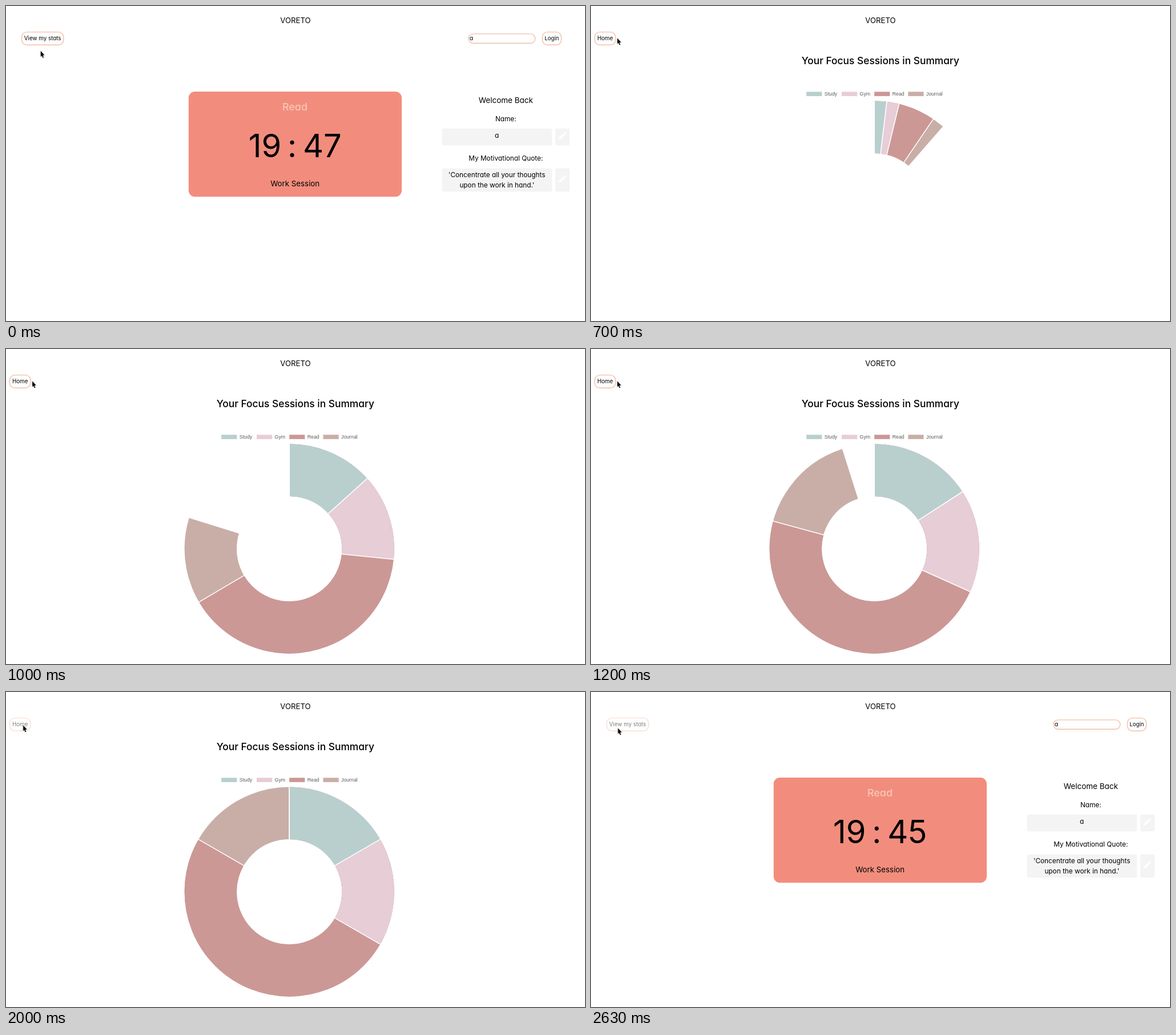
An HTML page that plays this animation: 1014 px wide and 552 px high, repeating every 2.77 s.

```html
<!DOCTYPE html>
<html lang="en">
<head>
<meta charset="utf-8">
<title>Focus timer</title>
<style>
@property --u { syntax: "<number>"; inherits: true; initial-value: 1; }

html, body { margin: 0; width: 100%; height: 100%; overflow: hidden; background: #fff; }
svg { display: block; width: 100%; height: 100%; }
text {
  font-family: Inter, "Open Sans", sans-serif;
  font-feature-settings: "cv11", "calt" 0;
  font-optical-sizing: none;
  text-anchor: middle;
}

.home, .stats, .cursor, .ring, .btn, .early, .late { animation: 2770ms step-end infinite; }
.home { animation-name: home; }
.stats { animation-name: stats; }
.early { animation-name: early; }
.late { animation-name: late; }
.cursor { animation-name: move; }
.view { animation-name: view; }
.back { animation-name: back; }

.outline { fill: #fff; stroke: #f2bfab; stroke-width: 1.4; }
.btn text { font-size: 9.8px; }
.field { fill: #f4f4f4; }
.time { font-size: 56px; word-spacing: -5px; }
.label { font-size: 11.8px; }
.quote { font-size: 11.8px; }
.legend text { font: 8.75px "Liberation Sans", Arial, sans-serif; fill: #5c5c5c; text-anchor: start; }

/* Quartic ease-out, sampled ten times a second */
.ring { animation-name: sweep; }
.ring * { --p: calc(1 - var(--u) * var(--u) * var(--u) * var(--u)); }
.ring circle {
  fill: none;
  stroke-width: 91.4;
  stroke-dasharray: calc(var(--p) * var(--k) * 1px) 400px;
  transform: rotate(-90deg);
}
.ring line {
  stroke: #fff;
  stroke-width: 1.6;
  transform: rotate(calc(var(--p) * var(--k) * 1deg));
}

@keyframes home { 0% { opacity: 1 } 25.27% { opacity: 0 } 86.64%, 100% { opacity: 1 } }
@keyframes stats { 0% { opacity: 0 } 25.27% { opacity: 1 } 86.64%, 100% { opacity: 0 } }
@keyframes early { 0% { opacity: 1 } 50%, 100% { opacity: 0 } }
@keyframes late { 0% { opacity: 0 } 50%, 100% { opacity: 1 } }
@keyframes view { 0% { opacity: 1 } 7.22%, 100% { opacity: .5 } }
@keyframes back { 0% { opacity: 1 } 64.98%, 100% { opacity: .5 } }
@keyframes sweep {
  0% { --u: .9702 }
  25.27% { --u: .9702; animation-timing-function: steps(10) }
  61.37%, 100% { --u: -.0298 }
}
@keyframes move {
  0% { transform: translate(61px, 79.5px) }
  3.61% { transform: translate(56px, 70px) }
  7.22% { transform: translate(49px, 61px) }
  10.83% { transform: translate(46.3px, 57px) }
  61.37% { transform: translate(44px, 57.5px) }
  64.98% { transform: translate(37px, 58.5px) }
  68.59% { transform: translate(32px, 59px) }
  72.2% { transform: translate(30.3px, 59px) }
  90.25% { transform: translate(38px, 61.5px) }
  94.94%, 100% { transform: translate(47.5px, 64px) }
}
</style>
</head>
<body>
<svg viewBox="0 0 1014 552">
  <defs>
    <g id="pencil" fill="#fff">
      <path d="M-6 6V3.3L1.5-4.2 4.2-1.5-3.3 6ZM2.4-5.1 3.9-6.5Q4.4-6.9 4.9-6.5L6.5-4.9Q6.9-4.4 6.5-3.9L5.1-2.4Z"/>
    </g>
  </defs>

  <text x="507" y="29.7" font-size="13.2">VORETO</text>

  <g class="home">
    <g class="btn view">
      <rect class="outline" x="27.5" y="45.6" width="73.3" height="22.7" rx="9"/>
      <text x="64.2" y="60">View my stats</text>
    </g>
    <rect class="outline" x="810" y="48.9" width="116.8" height="16.3" rx="8.1"/>
    <text x="815" y="60.3" font-size="10.5">a</text>
    <rect class="outline" x="939.3" y="45.6" width="33.2" height="22.7" rx="9"/>
    <text x="955.9" y="60" font-size="9.6">Login</text>

    <rect x="319.8" y="150" width="373.2" height="184.3" rx="11" fill="#f28d7d"/>
    <text x="506" y="182.7" font-size="17.9" font-weight="500" fill="#fac6b8">Read</text>
    <text class="time early" x="506.3" y="264.6">19 : 47</text>
    <text class="time late" x="506.3" y="264.6">19 : 45</text>
    <text x="506.2" y="315.6" font-size="13.3">Work Session</text>

    <text x="875.3" y="170" font-size="13.5">Welcome Back</text>
    <text class="label" x="875.3" y="201.6">Name:</text>
    <rect class="field" x="763.5" y="214.8" width="192.8" height="29.4" rx="3"/>
    <rect class="field" x="962" y="214.8" width="25.2" height="29.4" rx="3"/>
    <use href="#pencil" x="974.4" y="227.6"/>
    <text class="quote" x="859.5" y="230.6">a</text>
    <text class="label" x="875.3" y="271.2">My Motivational Quote:</text>
    <rect class="field" x="763.5" y="284.6" width="192.8" height="40.6" rx="3"/>
    <rect class="field" x="962" y="284.6" width="25.2" height="40.6" rx="3"/>
    <use href="#pencil" x="974.4" y="303"/>
    <text class="quote" x="859.7" y="300.2">'Concentrate all your thoughts</text>
    <text class="quote" x="859.9" y="318">upon the work in hand.'</text>
  </g>

  <g class="stats">
    <g class="btn back">
      <rect class="outline" x="6.4" y="45.6" width="36.6" height="22.7" rx="9"/>
      <text x="24.7" y="60">Home</text>
    </g>
    <text x="506.8" y="102" font-size="17.35" font-weight="500">Your Focus Sessions in Summary</text>

    <g class="legend">
      <rect x="377.2" y="150.3" width="27.2" height="7.6" fill="#b8cfce"/>
      <text x="408.8" y="157.2">Study</text>
      <rect x="439" y="150.3" width="27.2" height="7.6" fill="#e6cdd6"/>
      <text x="470.6" y="157.2">Gym</text>
      <rect x="496.2" y="150.3" width="27.2" height="7.6" fill="#cb9896"/>
      <text x="527.8" y="157.2">Read</text>
      <rect x="555.4" y="150.3" width="27.2" height="7.6" fill="#c8aea7"/>
      <text x="587" y="157.2">Journal</text>
    </g>

    <!-- Each arc starts at the top and overlaps the longer one below it -->
    <g class="ring" transform="translate(496.2 350.1)">
      <circle r="137.9" pathLength="360" stroke="#c8aea7" style="--k:360"/>
      <circle r="137.9" pathLength="360" stroke="#cb9896" style="--k:300"/>
      <circle r="137.9" pathLength="360" stroke="#e6cdd6" style="--k:120"/>
      <circle r="137.9" pathLength="360" stroke="#b8cfce" style="--k:60"/>
      <line y1="-91" y2="-185" style="--k:0"/>
      <line y1="-91" y2="-185" style="--k:60"/>
      <line y1="-91" y2="-185" style="--k:120"/>
      <line y1="-91" y2="-185" style="--k:300"/>
      <line y1="-91" y2="-185" style="--k:360"/>
    </g>
  </g>

  <g class="cursor">
    <path d="M-.3-.8V9.4L1.8 7.4 3.5 11.5 5.1 10.8 3.5 6.8H6.6Z" stroke="#fff" stroke-width="1.2" paint-order="stroke"/>
  </g>
</svg>
</body>
</html>
```
